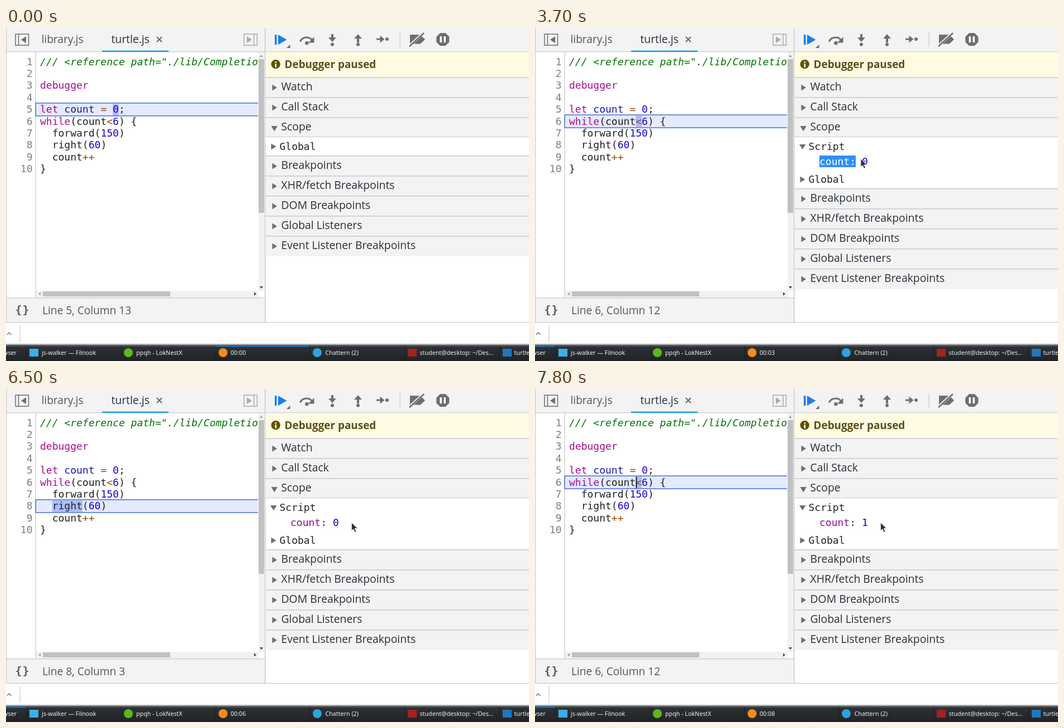
An HTML page for the animation above (8 s loop, 936 by 598 pixels).

```html
<!DOCTYPE html>
<html lang="en">
<head>
<meta charset="utf-8">
<title>Stepping through a loop</title>
<style>
  html, body { margin: 0; width: 100%; height: 100%; overflow: hidden; background: #fff; }
  svg { display: block; width: 936px; height: 598px; }
  text { white-space: pre; }
  .ui { font: 19.35px "Open Sans", "Noto Sans", sans-serif; fill: #27303a; }
  .tab { font-size: 19.1px; fill: #555; }
  .bold { font-weight: 700; font-size: 18.9px; fill: #5c5019; }
  .code { font: 18px "DejaVu Sans Mono", monospace; fill: #222; }
  .brace { font-size: 20px; font-weight: 700; fill: #5c5c5c; }
  .num { fill: #808080; text-anchor: end; }
  .task { font: 10.7px "Noto Sans", "Open Sans", sans-serif; fill: #eff0f1; }
  .key { fill: #aa0d91; }
  .def { fill: #1a1aa6; }
  .lit { fill: #1c00cf; }
  .op { fill: #994500; }
  .note { fill: #007400; font-style: italic; }
  .prop { fill: #881391; }
  .white { fill: #fff; }
  .bar { fill: #f3f3f3; }
  .rule { fill: #cacaca; }
  .icon { fill: #6e6e6e; }
  .line { fill: none; stroke: #6e6e6e; }
</style>
</head>
<body>
<svg viewBox="0 0 936 598">
  <defs>
    <clipPath id="editorClip"><rect x="52" y="43" width="399" height="429"/></clipPath>
    <clipPath id="selClip"><rect id="selClipBox" x="509" y="229" width="0" height="21"/></clipPath>
    <linearGradient id="dark" x2="0" y2="1">
      <stop offset="0" stop-color="#2e3236"/>
      <stop offset="1" stop-color="#202326"/>
    </linearGradient>
    <linearGradient id="shade" x2="0" y2="1">
      <stop offset="0" stop-color="#fff"/>
      <stop offset="1" stop-color="#777b7e"/>
    </linearGradient>
  </defs>
  <rect width="936" height="598" fill="#fff"/>

  <!-- Editor -->
  <path class="rule" d="M52.500 43h1.300v441h-1.300z"/>
  <g id="editor" clip-path="url(#editorClip)">
    <rect id="exec" x="53.2" width="420" height="23" fill="#e4eaff" stroke="#3f70e0" stroke-width="1.5"/>
    <rect id="token" height="21.5" fill="#abbdfb"/>
    <g id="code"></g>
    <rect id="caret" width="1.6" height="21" fill="#000"/>
  </g>
  <g id="numbers"></g>

  <!-- Scrollbars -->
  <path fill="#f1f1f1" d="M452 43h11v429h-11zM54 472h398v12h-398z"/>
  <path fill="#c1c1c1" d="M452 56h10v276h-10zM66 473h228v9h-228z"/>
  <path fill="#a3a3a3" d="M454 52l3-4 3 4zM62 474.500v6l-4-3z"/>
  <path fill="#404040" d="M454 464h6l-3 4zM444 474.500v6l4-3z"/>

  <!-- Tabs and status bar -->
  <path class="bar" d="M0 0h936v42h-936zM0 485h463v43h-463z"/>
  <path class="rule" d="M0 42h936v1.200h-936zM0 484h463v1.200h-463zM0 528h936v1.200h-936zM0 0h1.200v528h-1.200zM463 0h1.500v528h-1.500z"/>
  <rect x="172" y="40.500" width="119" height="2.500" fill="#1a9be8"/>
  <g class="line" stroke-width="1.500">
    <path d="M17 11h23.500v20h-23.500zM22.500 11v20"/>
    <path stroke="#aaa" d="M426 11h23.500v20h-23.500zM444 11v20"/>
    <path stroke-width="2.300" d="M269.800 16l9 9m0-9l-9 9"/>
  </g>
  <path class="icon" d="M36 15v12l-9-6z"/>
  <path fill="#aaa" d="M431 15v12l9-6z"/>
  <text class="ui tab" x="63.500" y="27">library.js</text>
  <text class="ui" x="188.500" y="27">turtle.js</text>
  <text class="code brace" x="16.500" y="513">{</text>
  <text class="code brace" x="29.500" y="513">}</text>
  <text id="status" class="ui tab" x="65" y="513.500"></text>

  <!-- Debugger toolbar -->
  <path fill="#1a80e6" d="M481 12h3.500v18h-3.500zM487 12l15.500 9-15.500 9z"/>
  <path class="icon" d="M508.500 29.500v6.500h-6.500z"/>
  <g id="steps">
    <path class="line" stroke-width="3" d="M526.500 24.500a12 11 0 0 1 21.500-2.500"/>
    <path class="icon" d="M551.500 16v10.500h-10.500z"/>
    <path class="icon" d="M582 11h4v6h5l-7 8-7-8h5zM628 26h4v-7h5l-7-8-7 8h5zM663 18.500h6.500v-5l8 6.500-8 6.500v-5h-6.500z"/>
    <g class="icon">
      <circle cx="538.500" cy="27" r="3.300"/><circle cx="584" cy="29.500" r="3"/>
      <circle cx="630" cy="29.500" r="3"/><circle cx="682" cy="20" r="3"/>
    </g>
  </g>
  <rect class="rule" x="704.500" y="8" width="1.300" height="26"/>
  <path class="icon" d="M723 12h18.500l8.500 8.500-8.500 8h-18.500z"/>
  <path d="M721 33l26-24" stroke="#f3f3f3" stroke-width="5"/>
  <path class="line" stroke-width="2.500" d="M722 33l26-24"/>
  <path class="icon" d="M777 9h9.500l6.800 6.800v9.500l-6.800 6.800h-9.500l-6.800-6.800v-9.500z"/>
  <path class="white" d="M776.500 15h3.500v11h-3.500zM783.500 15h3.500v11h-3.500z"/>

  <!-- Sidebar -->
  <rect x="464.500" y="43" width="472" height="45" fill="#fffbe3"/>
  <circle cx="482.700" cy="65" r="8.200" fill="#5f5200"/>
  <path fill="#fffbe3" d="M481.500 60h2.600v2.600h-2.600zM481.500 64h2.600v6.500h-2.600z"/>
  <text class="ui bold" x="498.500" y="71.500">Debugger paused</text>
  <g id="upper"></g>
  <g id="script">
    <path id="scriptTip" class="icon"/>
    <text class="code" x="489.500" y="219">Script</text>
    <g id="entry">
      <text class="code" x="509" y="246"><tspan class="prop">count</tspan>: <tspan class="lit value"></tspan></text>
      <g clip-path="url(#selClip)">
        <rect x="509" y="229" width="87" height="21" fill="#2e90fa"/>
        <text class="code white" x="509" y="246">count: <tspan class="value"></tspan></text>
      </g>
    </g>
  </g>
  <g id="lower">
    <path class="icon" d="M474.500 207.500l9 5.500-9 5.500z"/>
    <text class="code" x="489.500" y="219">Global</text>
  </g>

  <!-- Desktop strip -->
  <path class="line" stroke-width="1.300" d="M2 551l3.700-4 3.700 4"/>
  <rect class="rule" x="24.500" y="534" width="1.200" height="30"/>
  <rect y="566" width="936" height="4" fill="url(#shade)"/>
  <rect y="569.500" width="936" height="29" fill="url(#dark)"/>
  <rect y="570" width="936" height="2" fill="#4d5256"/>
  <g id="tasks"></g>
  <rect id="active" y="570" height="2.500" fill="#1c70bd"/>
  <text id="clock" class="task" x="402" y="587"></text>

  <path id="mouse" d="M0 0v14.500l3.200-3 2.800 5.800 2.500-1.200-2.800-5.600 4.600-.500z" fill="#303336" stroke="#fff" stroke-width=".7"/>
</svg>

<script>
const LOOP = 8000, CHAR = 10.836, LEFT = 61, PITCH = 21.36;
const $ = id => document.getElementById(id);
const values = document.querySelectorAll('.value');
const add = (id, markup) => $(id).insertAdjacentHTML('beforeend', markup);
const set = (id, attrs) => {
  for (const name in attrs) $(id).setAttribute(name, attrs[name]);
};
const show = (id, on) => set(id, { visibility: on ? 'visible' : 'hidden' });

const span = (cls, text) => `<tspan class="${cls}">${text}</tspan>`;
const listing = [
  span('note', '/// &lt;reference path="./lib/Completion.js" /&gt;'),
  '',
  span('key', 'debugger'),
  '',
  `${span('key', 'let')} ${span('def', 'count')} ${span('op', '=')} ${span('lit', 0)};`,
  `${span('key', 'while')}(count${span('op', '&lt;')}${span('lit', 6)}) {`,
  `  forward(${span('lit', 150)})`,
  `  right(${span('lit', 60)})`,
  `  count${span('op', '++')}`,
  '}'
];
listing.forEach((row, i) => {
  const y = Math.round(66.75 + PITCH * i);
  add('code', `<text class="code" x="${LEFT}" y="${y}">${row}</text>`);
  add('numbers', `<text class="code num" x="47.5" y="${y}">${i + 1}</text>`);
});

function section(group, name, y, open) {
  const tip = open ? `M474.500 ${y + 15}h11.500l-5.700 9.500z` : `M476.500 ${y + 12.5}l8.500 5.500-8.500 5.500z`;
  add(group, `<rect class="bar" x="464.5" y="${y}" width="472" height="36"/>
    <rect class="rule" x="464.5" y="${y - 1}" width="472" height="1.5"/>
    <path class="icon" d="${tip}"/>
    <text class="ui" x="492.5" y="${y + 23}">${name}</text>`);
}
['Watch', 'Call Stack', 'Scope'].forEach((name, i) => section('upper', name, 89 + 36 * i, i === 2));
add('upper', '<path class="white" d="M464.500 196h472v14h-472z"/><path class="rule" d="M464.500 195h472v1h-472z"/>');
['Breakpoints', 'XHR/fetch Breakpoints', 'DOM Breakpoints', 'Global Listeners', 'Event Listener Breakpoints']
  .forEach((name, i) => section('lower', name, 230 + 36 * i));

const dot = (x, color) => `<circle cx="${x}" cy="583" r="8" fill="${color}"/>`;
const box = (x, color) => `<rect x="${x - 8}" y="576" width="16" height="14" fill="${color}"/>`;
const label = (x, text) => `<text class="task" x="${x}" y="587">${text}</text>`;
for (const x of [36, 206, 375, 543, 713, 883])
  add('tasks', `<rect x="${x}" y="571" width="1" height="27" fill="#1b1e20"/>`);
add('tasks',
  label(-5, 'wser') +
  box(50, '#3daee9') + label(64, 'js-walker — Filnook') +
  dot(219, '#5cb81c') + label(233, 'ppqh - LokNestX') +
  dot(388.5, '#f58a1f') +
  dot(557, '#2fa3dc') + label(571.5, 'Chattern (2)') +
  box(727, '#a3221f') + label(740.5, 'student@desktop: ~/Des...') +
  box(897, '#2277bd') + label(909.5, 'turtle.js'));

// Each track lists [time, value]; a value holds until the next time.
const at = (track, t) => {
  let value;
  for (const [time, v] of track) if (t >= time) value = v;
  return value;
};
const lineTrack = [[0, 5], [2000, 6], [5200, 7], [6000, 8], [6700, 9], [7800, 6]];
const caretTrack = [[0, 0], [2000, 1], [3500, 0], [5200, 1], [5700, 0], [6000, 1], [6500, 0], [6700, 1], [7300, 0], [7800, 1]];
const selectTrack = [[0, 0], [3500, 2], [3600, 4], [3700, 6], [3800, 8], [4500, 0]];
const mouseTrack = [[3200, [505, 235]], [3500, [527, 235]], [3600, [557, 235]], [3700, [583, 235]],
  [3800, [598, 236]], [3900, [604, 236]], [4300, [616, 239]], [4800, [618.5, 240]]];
const ticks = [1200, 2200, 3200, 3900, 4800, 5800, 6800, 7700];
const tokens = { 5: [12, 1], 6: [11, 1], 7: [2, 7], 8: [2, 5], 9: [2, 5] };

function draw(t) {
  const line = at(lineTrack, t), [col, len] = tokens[line];
  const top = 134.75 + PITCH * (line - 5), x = LEFT + col * CHAR;
  set('exec', { y: top });
  set('token', { x, y: top + .75, width: len * CHAR });
  set('caret', { x: x + .5, y: top + 1.2 });
  show('caret', at(caretTrack, t));
  $('status').textContent = `Line ${line}, Column ${col + 1}`;

  const stepped = t >= 2000, folded = t >= 6700 && t < 6800;
  show('script', stepped);
  set('entry', { display: folded ? 'none' : 'inline' });
  set('scriptTip', { d: folded ? 'M474.500 207.500l9 5.500-9 5.500z' : 'M473 209h11.500l-5.700 9z' });
  set('lower', { transform: `translate(0 ${!stepped ? 0 : folded ? 32 : 59})` });
  values.forEach(el => { el.textContent = t < 7800 ? 0 : 1; });
  set('selClipBox', { width: at(selectTrack, t) * CHAR });

  const busy = (t >= 5900 && t < 6000) || (t >= 7700 && t < 7800);
  set('steps', { opacity: busy ? .45 : 1 });
  set('active', t < 1400 ? { x: 375, width: 168 } : { x: 0, width: 36 });
  $('clock').textContent = '00:0' + ticks.filter(time => t >= time).length;

  const tip = at(mouseTrack, t);
  show('mouse', tip);
  if (tip) set('mouse', { transform: `translate(${tip})` });
}

function frame() {
  draw(performance.now() % LOOP);
  requestAnimationFrame(frame);
}
frame();
</script>
</body>
</html>
```
